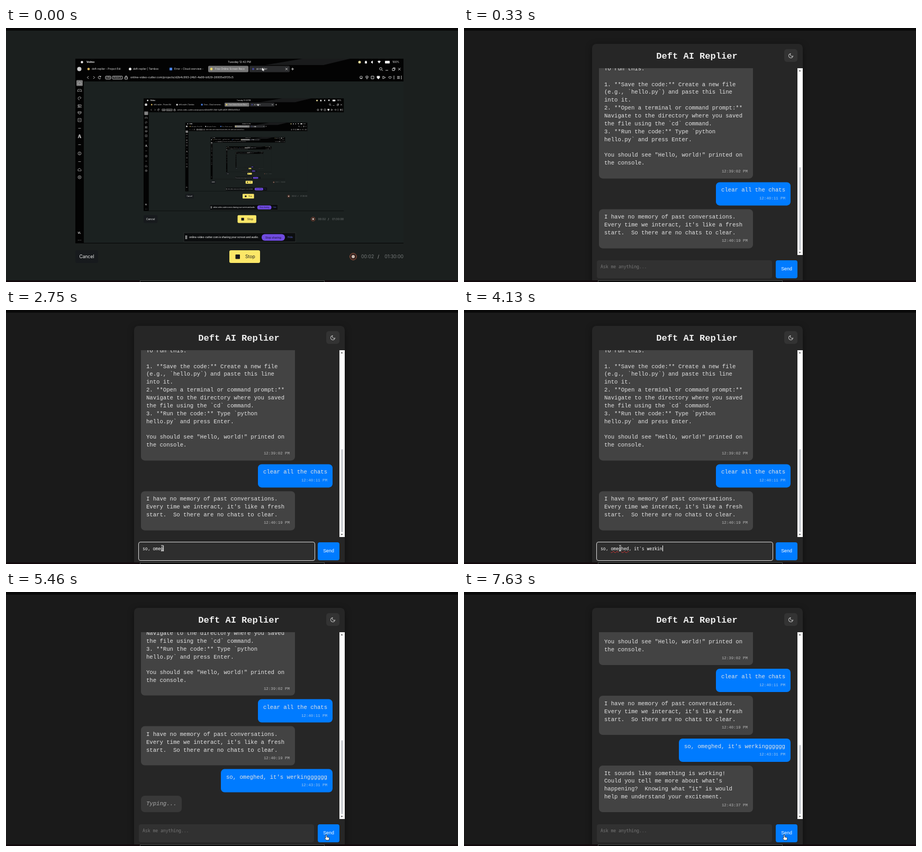
Recreate the animation shown at these times as an HTML page. Size 854 by 480 pixels, loop 8870 ms.

```html
<!DOCTYPE html>
<html lang="en">
<head>
<meta charset="utf-8">
<title>Chat demo</title>
<style>
  html, body { margin: 0; width: 100%; height: 100%; overflow: hidden; background: #1a1a1a; }
  #stage { position: relative; width: 854px; height: 480px; overflow: hidden; background: #1a1a1a; }
  #stage * { box-sizing: border-box; }
  .abs { position: absolute; }

  /* Every timeline shares the same loop and jumps unless a keyframe says otherwise. */
  .loop { animation: 8870ms step-end infinite; }

  .card { left: 242px; top: 30px; width: 398px; height: 460px; border-radius: 8px;
    background: #262626; box-shadow: 0 3px 13px rgba(0,0,0,.4); }
  h1 { position: absolute; left: 242px; top: 43px; width: 396px; margin: 0; text-align: center;
    font: bold 17.07px/21px "Liberation Mono", monospace; color: #f0f0f0; white-space: pre; }
  .theme { left: 605px; top: 40px; width: 25px; height: 24px; border-radius: 5px; background: #333; }

  .view { left: 242px; top: 76px; width: 388px; height: 353px; overflow: hidden;
    font: 10.61px/14.86px "Liberation Mono", monospace; color: #e4e4e4; }
  .list { left: 13px; right: 13px; bottom: 13px; display: flex; flex-direction: column; gap: 7px;
    animation-name: scroll; }
  .msg { padding: 8px 10px; border-radius: 7px; white-space: pre; background: #434343; }
  .bot { align-self: flex-start; width: 291px; }
  .user { align-self: flex-end; background: #007bff; }
  .msg time { display: block; margin-top: 2.65px; text-align: right;
    font-size: 7.45px; line-height: 10.4px; opacity: .72; }
  .sent { animation-name: sent; }
  .reply { animation-name: reply; }
  .typing { left: 13px; bottom: 13px; background: #383838; color: #a8a8a8; font-style: italic;
    animation-name: typing; }

  .bar { left: 630px; top: 76px; width: 10px; height: 353px; background: #fff; }
  .thumb { left: 3px; width: 4px; bottom: 9px; border-radius: 2px; background: #cdd0d5;
    animation-name: thumb; }

  .field { left: 251px; top: 439px; width: 331px; height: 34px; border-radius: 4px; background: #313131; }
  .ring { left: 250px; top: 438px; width: 334px; height: 36px; border: 1px solid #dcdcdc;
    border-radius: 4px; background: #2e2e2e; animation-name: ring; }
  .entry { left: 258px; top: 445px; height: 13px; display: flex; white-space: pre;
    font: 8.1px/11px "Noto Sans Mono", monospace; color: #fff; }
  .hint { color: #787878; animation-name: hint; }
  .typed { flex: none; overflow: hidden; height: 14px; animation-name: type; }
  .caret { flex: none; width: 1px; height: 11px; background: #fff; animation-name: caret; }
  .typo { text-decoration: underline wavy .6px transparent; text-underline-offset: 1px; }
  .typo1 { animation-name: typo1; }
  .typo2 { animation-name: typo2; }
  .send { left: 589px; top: 439px; width: 41px; height: 34px; border-radius: 4px; background: #007bff;
    color: #fff; text-align: center; font: 8.84px/33px "Liberation Sans", sans-serif; }

  .pointer { left: 0; top: 0; width: 1px; height: 1px; overflow: visible; animation-name: move; }
  .arrow { animation-name: arrow; }
  .beam { animation-name: beam; }
  .hand { animation-name: hand; }

  .opening { left: 0; top: 0; animation-name: opening; }
  .opening text { font-family: Inter, sans-serif; white-space: pre; }

  .top { left: 0; top: 0; width: 854px; height: 5px; background: #090909; }
  .bottom { left: 0; top: 477px; width: 854px; height: 3px; background: #12090c; }
  .dock { left: 253px; top: 477px; width: 349px; height: 4px; background: #050505; border: 1px solid #4a4a4a; }

  @keyframes opening { 0% { visibility: visible } .451%, 100% { visibility: hidden } }
  @keyframes scroll {
    0% { transform: translateY(146.4px) }
    59.752% { transform: translateY(57.6px) }
    85.006%, 100% { transform: none }
  }
  @keyframes thumb { 0% { top: 187px } 59.752% { top: 204px } 85.006%, 100% { top: 213px } }
  @keyframes sent { 0% { visibility: hidden } 59.752%, 100% { visibility: visible } }
  @keyframes reply { 0% { visibility: hidden } 85.006%, 100% { visibility: visible } }
  @keyframes typing { 0%, 85.006%, 100% { visibility: hidden } 59.752% { visibility: visible } }
  @keyframes ring { 0%, 59.752%, 100% { visibility: hidden } 12.176% { visibility: visible } }
  @keyframes hint { 0%, 59.752%, 100% { visibility: visible } 16.911% { visibility: hidden } }
  @keyframes type {
    0% { width: 0 }
    16.911% { width: 1ch }
    17.813% { width: 2ch }
    18.828% { width: 4ch }
    23.45% { width: 5ch }
    24.239% { width: 6ch }
    24.915% { width: 7ch }
    29.087% { width: 8ch }
    31.454% { width: 9ch; animation-timing-function: steps(7) }
    39.008% { width: 16ch }
    39.91% { width: 17ch; animation-timing-function: steps(7) }
    46.561% { width: 24ch; animation-timing-function: steps(5) }
    49.831% { width: 29ch }
    50.282% { width: 30ch }
    59.752%, 100% { width: 0 }
  }
  @keyframes caret {
    0%, 14.543%, 21.195%, 27.283%, 52.649%, 59.752%, 100% { visibility: hidden }
    12.176%, 16.911%, 23.45%, 29.087%, 55.017% { visibility: visible }
  }
  @keyframes typo1 { 0% { text-decoration-color: transparent } 34.69%, 100% { text-decoration-color: #d33 } }
  @keyframes typo2 { 0% { text-decoration-color: transparent } 52.198%, 100% { text-decoration-color: #d33 } }
  @keyframes move {
    0% { transform: translate(484px, -15px) }
    4.284% { transform: translate(484px, -15px); animation-timing-function: ease-in-out }
    11.725% { transform: translate(295px, 450px) }
    55.017% { transform: translate(295px, 450px); animation-timing-function: ease-in-out }
    58.625%, 100% { transform: translate(605px, 459px) }
  }
  @keyframes arrow { 0%, 10.823%, 100% { visibility: hidden } 4.284% { visibility: visible } }
  @keyframes beam { 0%, 58.061%, 100% { visibility: hidden } 10.823% { visibility: visible } }
  @keyframes hand { 0% { visibility: hidden } 58.061%, 100% { visibility: visible } }
</style>
</head>
<body>
<div id="stage">
  <div class="abs card"></div>
  <h1>Deft AI Replier</h1>
  <div class="abs theme">
    <svg class="abs" style="left:7px;top:6.5px" width="11" height="11" viewBox="0 0 24 24" fill="none" stroke="#e4e4e4" stroke-width="2" stroke-linejoin="round"><path d="M21 12.8A9 9 0 1 1 11.2 3 7 7 0 0 0 21 12.8z"/></svg>
  </div>

  <div class="abs view">
    <div class="abs list loop">
      <div class="msg bot">

To run this:

1. **Save the code:** Create a new file
(e.g., `hello.py`) and paste this line
into it.
2. **Open a terminal or command prompt:**
Navigate to the directory where you saved
the file using the `cd` command.
3. **Run the code:** Type `python
hello.py` and press Enter.

You should see "Hello, world!" printed on
the console.<time>12:39:02 PM</time></div>
      <div class="msg user">clear all the chats<time>12:40:11 PM</time></div>
      <div class="msg bot">I have no memory of past conversations.
Every time we interact, it's like a fresh
start.  So there are no chats to clear.<time>12:40:19 PM</time></div>
      <div class="msg user sent loop">so, omeghed, it's werkingggggg<time>12:43:31 PM</time></div>
      <div class="msg bot reply loop">It sounds like something is working!
Could you tell me more about what's
happening?  Knowing what "it" is would
help me understand your excitement.<time>12:43:37 PM</time></div>
    </div>
    <div class="abs msg typing loop">Typing...</div>
  </div>

  <div class="abs bar">
    <div class="abs thumb loop"></div>
    <svg class="abs" width="10" height="353" fill="#666"><path d="M2.5 6 4.5 3 6.5 6zM2.5 347 4.5 350 6.5 347z"/></svg>
  </div>

  <div class="abs field"></div>
  <div class="abs ring loop"></div>
  <div class="abs entry"><span class="hint loop">Ask me anything...</span></div>
  <div class="abs entry">
    <div class="typed loop">so, <span class="typo typo1 loop">omeghed</span>, it's <span class="typo typo2 loop">werkingggggg</span></div>
    <div class="caret loop"></div>
  </div>
  <div class="abs send">Send</div>

  <svg class="abs pointer loop">
    <path class="arrow loop" d="M0 0V11L2.6 8.6 4.3 12.2 6 11.4 4.4 8H8z" fill="#fff" stroke="#000" stroke-width=".7"/>
    <path class="beam loop" d="M-2-5H2M-2 5H2M0-5V5" fill="none" stroke="#ccc" stroke-width="1"/>
    <path class="hand loop" d="M-1 .3Q0-.8 1 .3V4L5 5Q6 5.4 5.8 7L5 10H0L-3 6.4Q-2.8 5-1 6.2z" fill="#fff" stroke="#111" stroke-width=".7"/>
  </svg>

  <svg class="abs opening loop" width="854" height="480">
    <defs>
      <g id="shot">
        <rect x="131" y="58" width="620" height="349" fill="#1b2120"/>
        <path d="M131 58H751V101H147V407H131z" fill="#030303"/>
        <path d="M490 70L560 58H650L600 70z" fill="#1a1b1c"/>
        <path d="M131 406.5H751" stroke="#050505"/>

        <!-- menu bar -->
        <g fill="#eee" font-size="5">
          <circle cx="143.5" cy="64.5" r="2.2"/>
          <text x="152" y="66" font-weight="700">Velmo</text>
          <text x="441" y="66" text-anchor="middle">Tuesday 12:42 PM</text>
          <circle cx="668" cy="64.5" r="2.5" fill="#e9dc9a"/>
          <path d="M678 67V64a2 2 0 0 1 4 0V67zM690 63H691L693 61.5V67.5L691 66H690zM702 63Q705 60.5 708 63L705 67z"/>
          <rect x="716" y="62" width="9" height="5" rx="1"/>
          <text x="730" y="66">100%</text>
        </g>

        <!-- tabs -->
        <rect x="382" y="71.5" width="76" height="12" rx="2" fill="#777"/>
        <rect x="460" y="71.5" width="76" height="12" rx="2" fill="#2a2b2d"/>
        <circle cx="138.5" cy="77.5" r="4" fill="#ccc"/>
        <circle cx="156" cy="77.5" r="2.3" fill="#d8b45a"/>
        <circle cx="234.5" cy="77.5" r="2.5" fill="#eee"/>
        <rect x="309" y="75" width="5" height="5" fill="#4a83e8"/>
        <circle cx="388" cy="77.5" r="2.4" fill="#e9d66a"/>
        <circle cx="467" cy="77.5" r="2" fill="#45489a"/>
        <g fill="#e4e4e4" font-size="4.8">
          <text x="162" y="79.3">deft-replier - Project Edi</text>
          <text x="240" y="79.3">deft-replier | Tarnbox</text>
          <text x="318" y="79.3">Error – Cloud overview -</text>
          <text x="395" y="79.3">Free Online Screen Reco</text>
          <text x="473" y="79.3">ai-replier</text>
        </g>
        <g fill="none" stroke="#ddd" stroke-width=".9">
          <path d="M528 75.5l4 4m0-4l-4 4M541.5 75v5M539 77.5h5"/>
          <circle cx="708" cy="77" r="2.3"/>
          <path d="M710 79l2 2M717 80h5M730 76.5h4v4h-4zM731 75h4v4M741 75.5l4.5 4.5m0-4.5l-4.5 4.5"/>
          <path d="M156 91l-2.5 2.5L156 96M165 91l2.5 2.5L165 96M179 92a2.6 2.6 0 1 0 0 3M179 90.5v2h-2"/>
          <rect x="188" y="91" width="10" height="5.5" rx="1"/>
          <rect x="201" y="91" width="19" height="5.5" rx="1"/>
          <path d="M225.5 93v-1a1.5 1.5 0 0 1 3 0v1M224.5 93h5v3.5h-5z"/>
          <circle cx="671" cy="93.5" r="2.5"/>
          <path d="M669.8 94.5h2.4M680 91h4v3h-4zM682 94v3M690 91h5v5h-5z"/>
          <path d="M701 91h5v3l-2.5 2.5-2.5-2.5z" fill="#eee"/>
          <path d="M712 91l5 2.5-5 2.5zM725.5 96l-2.5-2.5q0-2.5 2.5-1.5 2.5-1 2.5 1.5zM733 90v7M739 91.5h5M739 93.5h5M739 95.5h5M747 90v7"/>
        </g>
        <g fill="#eee">
          <text x="193" y="95.3" font-size="3.8" text-anchor="middle">VPN</text>
          <text x="210.5" y="95.3" font-size="3.8" text-anchor="middle">PRIVATE</text>
          <text x="235" y="95.3" font-size="5.3">online-video-cutter.com/projects/d2b4c993-24b1-4a99-b829-28905e0f35c5</text>
        </g>
        <path d="M484 75v6l1.5-1.2 1 2 1-.5-1-1.8h2z" fill="#fff"/>

        <!-- side bar -->
        <rect x="133" y="98.5" width="12" height="11" rx="1.5" fill="#777"/>
        <g fill="none" stroke="#bbb" stroke-width=".75">
          <path d="M136 104l3-2.5 3 2.5v3h-6zM136 116h6l1 4h-2l-1-1h-2l-1 1h-2zM142 132a3 3 0 1 0-3 4M139 133.5l3-1M136 145h6v3h-6zM135 150h8M138 145v5"/>
          <path d="M136 158h6v3l-3 2-3-2zM136 160h6M136 171h6v6h-6zM137.5 174h3M136.5 189.5h5M136.5 220.5h5M136.5 252.5h5"/>
          <path d="M136.5 208l2-6h1l2 6M139 205l2.5 3" stroke-width="1.5"/>
          <circle cx="139" cy="237" r="3"/><path d="M139 235v4"/>
          <path d="M136 270v-3l3-2 3 3v2z"/>
          <circle cx="139" cy="282" r="3"/><circle cx="139" cy="282" r="1"/>
          <path d="M136 401h6" stroke-dasharray="1 1.4"/>
        </g>
        <text x="138.5" y="389" font-size="4.6" font-weight="700" fill="#ddd" text-anchor="middle">VL</text>

        <!-- sharing notice -->
        <rect x="336" y="387" width="211" height="17" fill="#0b0d0e" stroke="#343838" stroke-width=".7"/>
        <path d="M339.5 392v7M341.5 392v7" stroke="#eee" stroke-width=".9"/>
        <text x="346" y="397.3" font-size="4.75" font-weight="500" fill="#eee">online-video-cutter.com is sharing your screen and audio.</text>
        <rect x="483" y="389.5" width="44" height="12.5" rx="6" fill="#704be0"/>
        <text x="505" y="397.5" font-size="5" fill="#170f35" text-anchor="middle">Stop sharing</text>
        <text x="537" y="397.3" font-size="4.7" fill="#5a5fd0" text-anchor="middle">Hide</text>

        <!-- recorder controls -->
        <rect x="131" y="420" width="43" height="24" rx="3" fill="#171a1d"/>
        <text x="152.5" y="435.2" font-size="8.5" fill="#f0f0f0" text-anchor="middle">Cancel</text>
        <rect x="422" y="420" width="58" height="24" rx="3" fill="#fce768"/>
        <rect x="433.5" y="428" width="8.5" height="8.5" rx="1" fill="#17191c"/>
        <text x="452" y="435.2" font-size="8.6" fill="#222">Stop</text>
        <circle cx="656" cy="432" r="6.3" fill="#30201d" stroke="#a35a42" stroke-width="1"/>
        <circle cx="656" cy="432" r="3" fill="#cbbab0"/>
        <g font-size="8.7" fill="#777b7b">
          <text x="671" y="435.2">00:02</text>
          <text x="702" y="435.2" fill="#aaa">/</text>
          <text x="751" y="435.2" text-anchor="end">01:30:00</text>
        </g>
      </g>
    </defs>

    <rect width="854" height="480" fill="#1b1f1e"/>
    <use href="#shot"/>
    <g transform="translate(180.1 97.6) scale(.61)"><use href="#shot"/>
      <g transform="translate(180.1 97.6) scale(.61)"><use href="#shot"/>
        <g transform="translate(180.1 97.6) scale(.61)"><use href="#shot"/>
          <g transform="translate(180.1 97.6) scale(.61)"><use href="#shot"/>
            <g transform="translate(180.1 97.6) scale(.61)"><use href="#shot"/></g>
          </g>
        </g>
      </g>
    </g>
  </svg>

  <div class="abs top"></div>
  <div class="abs bottom"></div>
  <div class="abs dock"></div>
</div>
</body>
</html>
```
